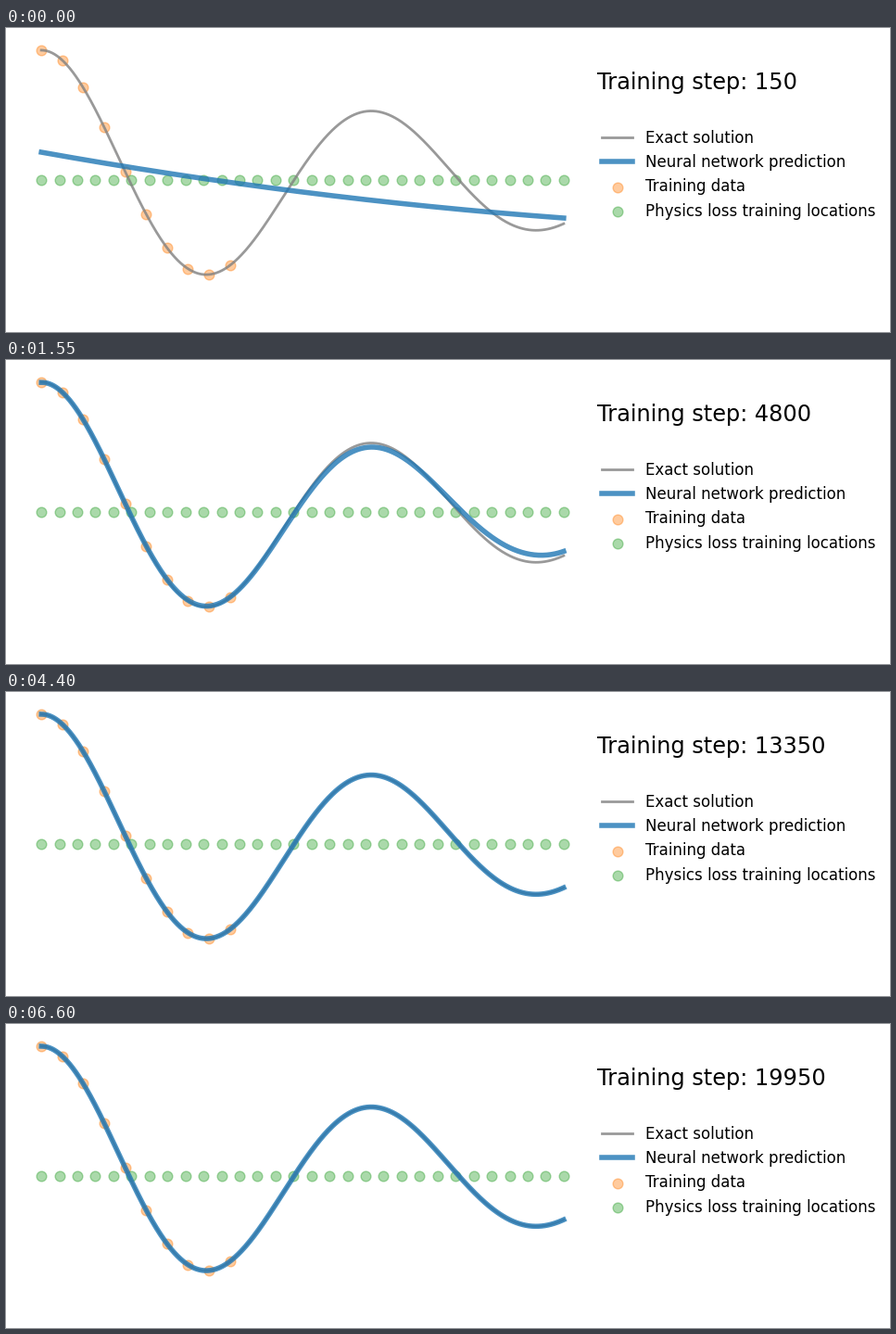
Animation of 954 by 328 pixels, one loop 6650 ms. Source, as a matplotlib script:

```python
import numpy as np
import matplotlib.pyplot as plt
from matplotlib.animation import FuncAnimation
from numpy.polynomial import Chebyshev

W, H, DPI = 954, 328, 100
FRAMES, INTERVAL, STEP = 133, 50, 150
X0, Y0, SX, SY = 38.18, 164, 563.64, 140  # pixel position of (0, 0) and unit sizes

t = np.linspace(0, 1, 500)


def oscillator(t, d=1, w0=10):
    w = np.sqrt(w0**2 - d**2)
    return np.exp(-d * t) * (np.cos(w * t) + d / w * np.sin(w * t))


def smooth(points, deg):
    """Smooth curve through a few pixel positions, in data units."""
    px, py = np.array(points, float).T
    return Chebyshev.fit((px - X0) / SX, (Y0 - py) / SY, deg, domain=[0, 1])(t)


exact = oscillator(t)

# Stages of the fit: nearly straight, first bend, data fitted, physics fitted
start = 0.214 - 0.72 * t + 0.213 * t**2
bend = smooth([(38, 78), (70, 100), (106, 133), (152, 179), (200, 208),
               (260, 219), (330, 216), (420, 204), (510, 194), (602, 188)], 5)
fitted = smooth([(38, 31), (60, 47), (83, 74), (106, 111), (130, 161),
                 (152, 203), (174, 231), (192, 242), (208, 244), (230, 241),
                 (252, 232), (280, 217), (320, 195.5), (360, 177),
                 (390, 166.5), (420, 159), (450, 153.8), (490, 150),
                 (520, 148.5), (545, 148), (575, 148.2), (602, 149)], 10)
gap = smooth([(38, 165), (75, 164), (110, 164), (150, 163), (185, 162),
              (216, 161.5), (252, 164), (280, 167.5), (310, 174.5),
              (330, 178), (360, 182), (394, 184), (425, 178.5), (458, 164),
              (490, 146), (524, 129.4), (560, 125.5), (580, 132),
              (602, 143)], 9)
# the gap points are measured downwards from the exact curve


def mix(a, b, p):
    return a + (b - a) * p


def prediction(k):
    if k <= 3:
        return mix(start, bend, k / 3)
    if k <= 7:
        return mix(bend, fitted, (k - 3) / 4)
    if k <= 19:
        return mix(fitted, exact + gap, ((k - 7) / 12) ** (0.5 + 0.4 * t))
    return exact + gap * np.exp(-(k - 19) / 8)


# the small excess keeps the pixel size from rounding down
fig = plt.figure(figsize=((W + 0.01) / DPI, (H + 0.01) / DPI), dpi=DPI,
                 facecolor="white")
plt.rcParams["font.family"] = "DejaVu Sans"
ax = fig.add_axes([10 / W, 10 / H, 620 / W, 308 / H])
ax.set_xlim(-0.05, 1.05)
ax.set_ylim(-1.1, 1.1)
ax.axis("off")

ax.plot(t, exact, color="grey", lw=2, alpha=0.8, label="Exact solution")
line, = ax.plot(t, start, color="tab:blue", lw=4, alpha=0.8,
                label="Neural network prediction")
ax.scatter(t[:200:20], exact[:200:20], s=60, color="tab:orange", alpha=0.4,
           label="Training data")
ax.scatter(np.linspace(0, 1, 30), np.zeros(30), s=60, color="tab:green",
           alpha=0.4, label="Physics loss training locations")
ax.legend(loc=(1.01, 0.34), frameon=False, fontsize="large", labelcolor="k")
title = ax.text(1.065, 0.7, "", fontsize="xx-large", color="k")


def update(k):
    line.set_ydata(prediction(k))
    title.set_text(f"Training step: {STEP * (k + 1)}")
    return line, title


anim = FuncAnimation(fig, update, frames=FRAMES, interval=INTERVAL,
                     repeat=True, repeat_delay=0)
plt.show()
```
